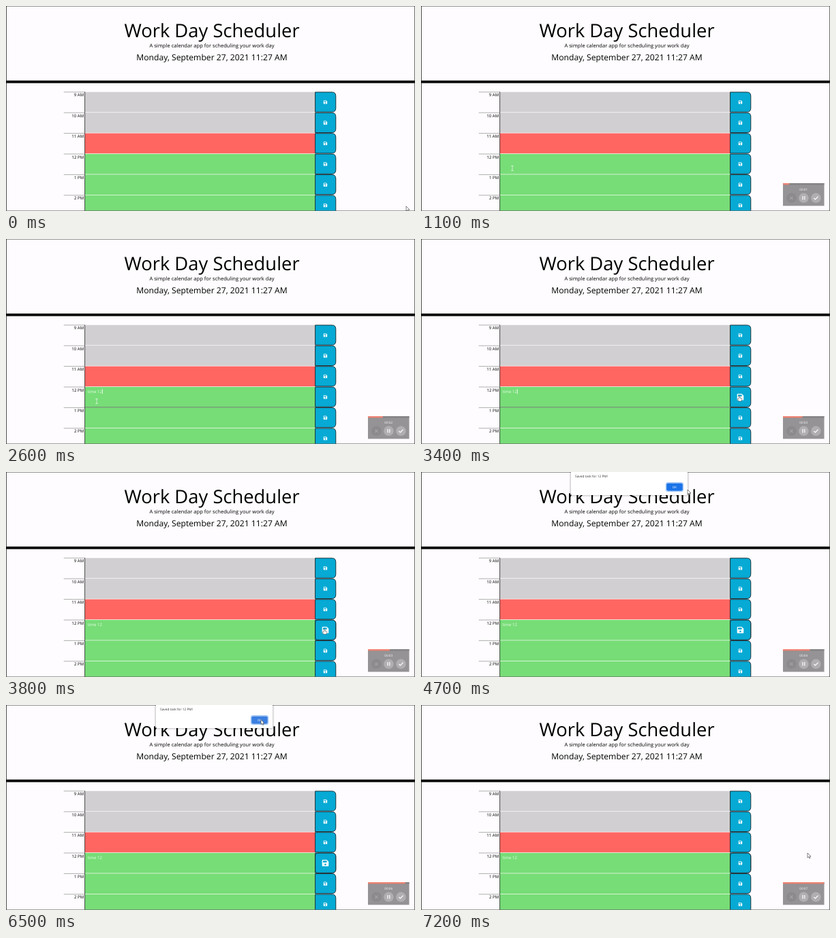
These frames come from a looping animation (600x302 px, 7.3 s). An HTML page:

```html
<!DOCTYPE html>
<html lang="en">
<head>
<meta charset="utf-8">
<title>Work Day Scheduler</title>
<style>
  html, body { margin: 0; width: 100%; height: 100%; overflow: hidden; background: #fefcfe; }
  svg { display: block; width: 600px; height: 302px; font-family: "Open Sans", "Noto Sans", sans-serif; text-rendering: geometricPrecision; }
  .mid { text-anchor: middle; }
</style>
</head>
<body>
<svg id="stage" viewBox="0 0 600 302"></svg>
<script>
const LOOP = 7300, FRAME = 1.633;
const ROW_TOP = 126.4, ROW_H = 30.4, LEFT = 115.6, RIGHT = 453.6, EDGE = 484;
const NOTE = 'time 12';
const NS = 'http://www.w3.org/2000/svg';
const stage = document.getElementById('stage');

function add(parent, tag, attrs, content) {
  const el = document.createElementNS(NS, tag);
  for (const name in attrs) el.setAttribute(name, attrs[name]);
  if (content) el.textContent = content;
  parent.append(el);
  return el;
}
const rect = (parent, x, y, width, height, fill, more) =>
  add(parent, 'rect', { x, y, width, height, fill, ...more });
const text = (parent, x, y, size, content, more) =>
  add(parent, 'text', { x, y, 'font-size': size, ...more }, content);
const group = (parent = stage) => add(parent, 'g', {});
const show = (el, on) => el.setAttribute('visibility', on ? 'visible' : 'hidden');

// Header
rect(stage, 0, 0, 600, 302, '#fefcfe');
text(stage, 302, 45.6, 27.36, 'Work Day Scheduler', { class: 'mid' });
text(stage, 302, 60.8, 7.6, 'A simple calendar app for scheduling your work day', { class: 'mid' });
text(stage, 302, 79.8, 12.16, 'Monday, September 27, 2021 11:27 AM', { class: 'mid' });
rect(stage, 0, 109.8, 600, 3.8, '#000');

// Hour rows
const PAST = '#d1cfd1', NOW = '#ff6662', NEXT = '#77dd77';
const hours = [['9 AM', PAST], ['10 AM', PAST], ['11 AM', NOW],
               ['12 PM', NEXT], ['1 PM', NEXT], ['2 PM', NEXT]];
const DISK = 'M1.4 0H10L14 4V12.6Q14 14 12.6 14H1.4Q0 14 0 12.6V1.4Q0 0 1.4 0Z' +
             'M2 2V6H10V2ZM7 8a2 2 0 1 0 .01 0Z';
const icons = hours.map(([label, fill], i) => {
  const y = ROW_TOP + i * ROW_H;
  add(stage, 'path', { d: `M85.2 ${y + .4}H${LEFT}`, stroke: '#444', 'stroke-width': .8, 'stroke-dasharray': '1 .9' });
  text(stage, 114.2, y + 7, 6.08, label, { 'text-anchor': 'end' });
  rect(stage, LEFT, y + .3, RIGHT - LEFT, ROW_H - .7, fill);
  rect(stage, LEFT - .3, y, .8, ROW_H, '#222');
  add(stage, 'path', {
    d: `M${RIGHT} ${y + .5}H478.2q5.6 0 5.6 5.6v18q0 5.6 -5.6 5.6H${RIGHT}z`,
    fill: '#06aad4', stroke: '#10222a', 'stroke-width': .9
  });
  return add(stage, 'path', { d: DISK, fill: '#fff', 'fill-rule': 'evenodd' });
});

// Editing state of the noon row
const noon = ROW_TOP + 3 * ROW_H;
const focusLine = rect(stage, LEFT, noon + ROW_H - .5, RIGHT - LEFT, .8, '#3b5c3b');
const buttonFocus = rect(stage, RIGHT, noon + .3, EDGE - RIGHT, ROW_H - .5, 'none',
  { rx: 5, stroke: '#111', 'stroke-width': .8, 'stroke-dasharray': '1 .8' });
const note = text(stage, 119.6, noon + 9.4, 6.08, '', { fill: '#f3fff3', 'fill-opacity': .9 });
const caret = rect(stage, 0, noon + 3.4, .7, 7.4, '#fff');

// Window edge
rect(stage, 0, 0, 600, .6, '#555');
rect(stage, 0, 0, .8, 302, '#222');
rect(stage, 599.3, 0, .7, 302, '#333');
rect(stage, 0, 301.4, 600, .6, '#666');

// Alert box
const dialog = group();
[2.4, 1.6, .8].forEach(d =>
  rect(dialog, 220 - d, -6, 171 + 2 * d, 40 + d, '#000', { rx: 2, 'fill-opacity': .06 }));
rect(dialog, 220, -6, 171, 40, '#fff', { rx: 1.5 });
text(dialog, 226, 8.4, 4.8, 'Saved task for 12 PM!', { fill: '#333' });
rect(dialog, 359.4, 15.6, 25.2, 13, '#fff', { rx: 2.2, stroke: '#8db9f3', 'stroke-width': .9 });
const okFace = rect(dialog, 360.2, 16.4, 23.6, 11.4, '#1a73e8', { rx: 1.7 });
text(dialog, 372, 23.8, 4.5, 'OK', { class: 'mid', fill: '#fff' });

// Recorder panel
const panel = group();
rect(panel, 531, 261, 60.5, 33.4, '#959395');
rect(panel, 531, 261, 60.5, 2.4, '#858385');
const bar = rect(panel, 531, 261, 0, 2.4, '#ee8475');
const clock = text(panel, 561.2, 271.6, 4.6, '', { class: 'mid', fill: '#fff' });
[[543.4, '#8c8a8c'], [561.4, '#b0aeb0'], [579.4, '#b0aeb0']].forEach(([cx, fill]) =>
  add(panel, 'circle', { cx, cy: 282.8, r: 7.3, fill }));
const mark = (d, stroke) =>
  add(panel, 'path', { d, stroke, fill: 'none', 'stroke-width': 1.2 });
mark('M541.2 280.6l4.4 4.4m0-4.4l-4.4 4.4', '#a5a3a5');
mark('M560 280v5.6m2.8-5.6v5.6', '#fff');
mark('M576.4 283l2 2 4.2-4.4', '#fff');

// Pointers
const pointer = group();
const shapes = {
  arrow: add(pointer, 'path', {
    d: 'M0 0V7L1.7 5.5 2.8 8 4 7.4 2.9 5.1H5Z',
    fill: '#fff', stroke: '#333', 'stroke-width': .6
  }),
  beam: add(pointer, 'path', {
    d: 'M-1.8 -3.5H1.8M0 -3.5V3.5M-1.8 3.5H1.8',
    stroke: '#e2f6e2', 'stroke-width': .8
  }),
  hand: add(pointer, 'path', {
    d: 'M-1 -2.4Q0 -3.4 .6 -2.4V0L3.4 .7Q4 1 3.8 2L3 5H-1L-3 1.9Q-2.8 .9 -1 2Z',
    fill: '#fff', stroke: '#333', 'stroke-width': .5
  })
};

// time, x, y
const route = [
  [0, 587, 295], [100, 587, 295], [600, 350, 268], [1000, 134, 239], [2700, 133, 239],
  [3300, 467, 234], [4000, 467, 234], [4600, 391, 26], [4800, 391, 26],
  [5200, 374, 21.6], [6700, 374, 21.6], [7200, 567, 218]
];
function pointerAt(t) {
  const i = Math.max(1, route.findIndex(p => p[0] >= t));
  const [t0, x0, y0] = route[i - 1], [t1, x1, y1] = route[i];
  const u = (t - t0) / (t1 - t0), e = u * u * (3 - 2 * u);
  return [x0 + (x1 - x0) * e, y0 + (y1 - y0) * e];
}

const startOf = k => Math.round(k * FRAME) * 100;
function held(t) {
  let k = Math.floor(t / 100 / FRAME) + 1;
  while (startOf(k) > t) k--;
  return startOf(k);
}

function draw(t) {
  const alertOn = t >= 4000 && t < 6700;
  const editing = t >= 1300 && t < 3600;
  const [x, y] = pointerAt(t);

  let kind = 'arrow';
  if (!alertOn && y > ROW_TOP && x < EDGE && x > LEFT) kind = x < RIGHT ? 'beam' : 'hand';
  for (const name in shapes) show(shapes[name], name === kind);
  pointer.setAttribute('transform', `translate(${x} ${y})`);

  const hot = alertOn ? 3 : kind === 'hand' ? Math.floor((y - ROW_TOP) / ROW_H) : -1;
  icons.forEach((icon, i) => {
    const s = (i === hot ? 9.6 : 5.4) / 14;
    const cy = ROW_TOP + (i + .5) * ROW_H;
    icon.setAttribute('transform', `translate(${468.5 - 7 * s} ${cy - 7 * s}) scale(${s})`);
  });

  const typed = Math.max(0, Math.min(NOTE.length, Math.floor((t - 1300) / 160)));
  note.textContent = NOTE.slice(0, typed);
  caret.setAttribute('x', 119.8 + (typed ? note.getComputedTextLength() : 0));
  show(caret, editing && (t < 2800 || t % 1000 < 500));
  show(focusLine, editing);
  show(buttonFocus, t >= 3600);

  show(dialog, alertOn);
  okFace.setAttribute('fill', x > 360 && x < 384 && y > 16 && y < 28 ? '#3a7fe0' : '#1a73e8');

  show(panel, t >= 200);
  bar.setAttribute('width', Math.min(1, t / 7200) * 60.5);
  clock.textContent = '00:0' + Math.floor(t / 1000);
}

const began = performance.now();
function tick() {
  draw(held((performance.now() - began) % LOOP));
  requestAnimationFrame(tick);
}
tick();
</script>
</body>
</html>
```
